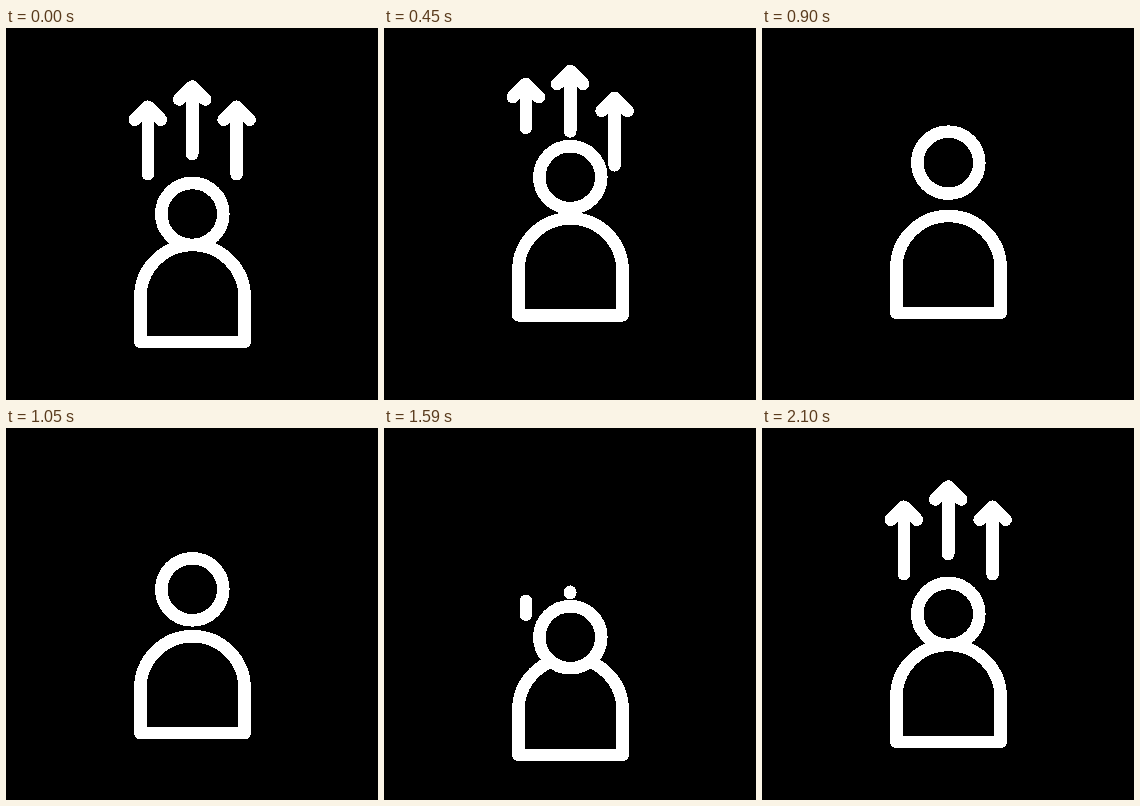
These frames come from a looping animation (372x372 px, 2.25 s). An HTML page:

```html
<!DOCTYPE html>
<html lang="en">
<head>
<meta charset="utf-8">
<title>Personal growth</title>
<style>
  html, body { margin: 0; width: 100%; height: 100%; overflow: hidden; background: #000; }
  svg { display: block; width: 100%; height: 100%; }
</style>
</head>
<body>
<svg viewBox="0 0 372 372" fill="none" stroke="#fff" stroke-width="12.6" stroke-linecap="round" stroke-linejoin="round" shape-rendering="crispEdges">
  <g id="arrows"></g>
  <path id="body" d="M134.4 0V-44.8a52.1 52.1 0 0 1 104.2 0V0Z"/>
  <circle id="head" cx="186.3" r="31" fill="#000"/>
</svg>
<script>
const TICK = 30, TICKS = 75;

// Cubic Bezier easing with horizontal end tangents: (a, 0, b, 1).
const ease = (a, b) => x => {
  if (x <= 0) return 0;
  if (x >= 1) return 1;
  let lo = 0, hi = 1;
  for (let i = 0; i < 24; i++) {
    const u = (lo + hi) / 2, v = 1 - u;
    if (3 * v * v * u * a + 3 * v * u * u * b + u * u * u < x) lo = u; else hi = u;
  }
  return lo * lo * (3 - 2 * lo);
};
const smooth = ease(1 / 3, 2 / 3);
const grow = ease(0.5, 0.5);
const settle = ease(0.33, 0.3);
const ramp = (t, from, to, curve = smooth) => curve((t - from) / (to - from));

const rise = ease(0.33, 0.335), recover = ease(0.33, 0.58);
const track = (rest, top, low, start, fall) => t =>
  rest + (top - rest) * ramp(t, start, start + 18, rise)
       + (low - top) * ramp(t, start + 18, start + 38, fall)
       + (rest - low) * ramp(t, start + 38, start + 59, recover);

const bodyY = track(313.9, 276.8, 337, 6, ease(0.5, 0.68));
const headY = track(186, 127.5, 222.5, 7, ease(0.57, 0.65));

const SHAFT = 67.5, WING = 13;
const arrows = [
  { x: 141.8, tip: 78.7, entry: 47 },
  { x: 186.2, tip: 58.5, entry: 39.5 },
  { x: 230.6, tip: 78.7, entry: 47 }
];

const byId = id => document.getElementById(id);
for (const arrow of arrows) {
  arrow.path = document.createElementNS("http://www.w3.org/2000/svg", "path");
  byId("arrows").append(arrow.path);
}

function arrowPath({ x, tip, entry }, index, t) {
  const out = t - 6 - 2 * index, back = t - 50 - 2 * index;
  let top, length, wing;
  if (out < 15) {
    top = tip - 38.3 * ramp(out, 0, 16);
    length = SHAFT * (1 - ramp(out, 5, 15));
    wing = WING * (1 - ramp(out, 12, 15));
  } else if (back > 0) {
    length = SHAFT * ramp(back, 0, 9, grow);
    wing = WING * ramp(back, 5, 9);
    top = tip + entry * (1 - ramp(back, 0, 16, settle)) + SHAFT - length;
  } else {
    return "";
  }
  const shaft = `M${x} ${top}v${length}`;
  return wing > 0 ? `${shaft}M${x - wing} ${top + wing}L${x} ${top}l${wing} ${wing}` : shaft;
}

function render(ms) {
  const t = Math.floor(ms / TICK) % TICKS;
  byId("body").setAttribute("transform", `translate(0 ${bodyY(t)})`);
  byId("head").setAttribute("cy", headY(t));
  arrows.forEach((arrow, i) => arrow.path.setAttribute("d", arrowPath(arrow, i, t)));
}

const start = performance.now();
function loop() {
  render(performance.now() - start);
  requestAnimationFrame(loop);
}
loop();
</script>
</body>
</html>
```
